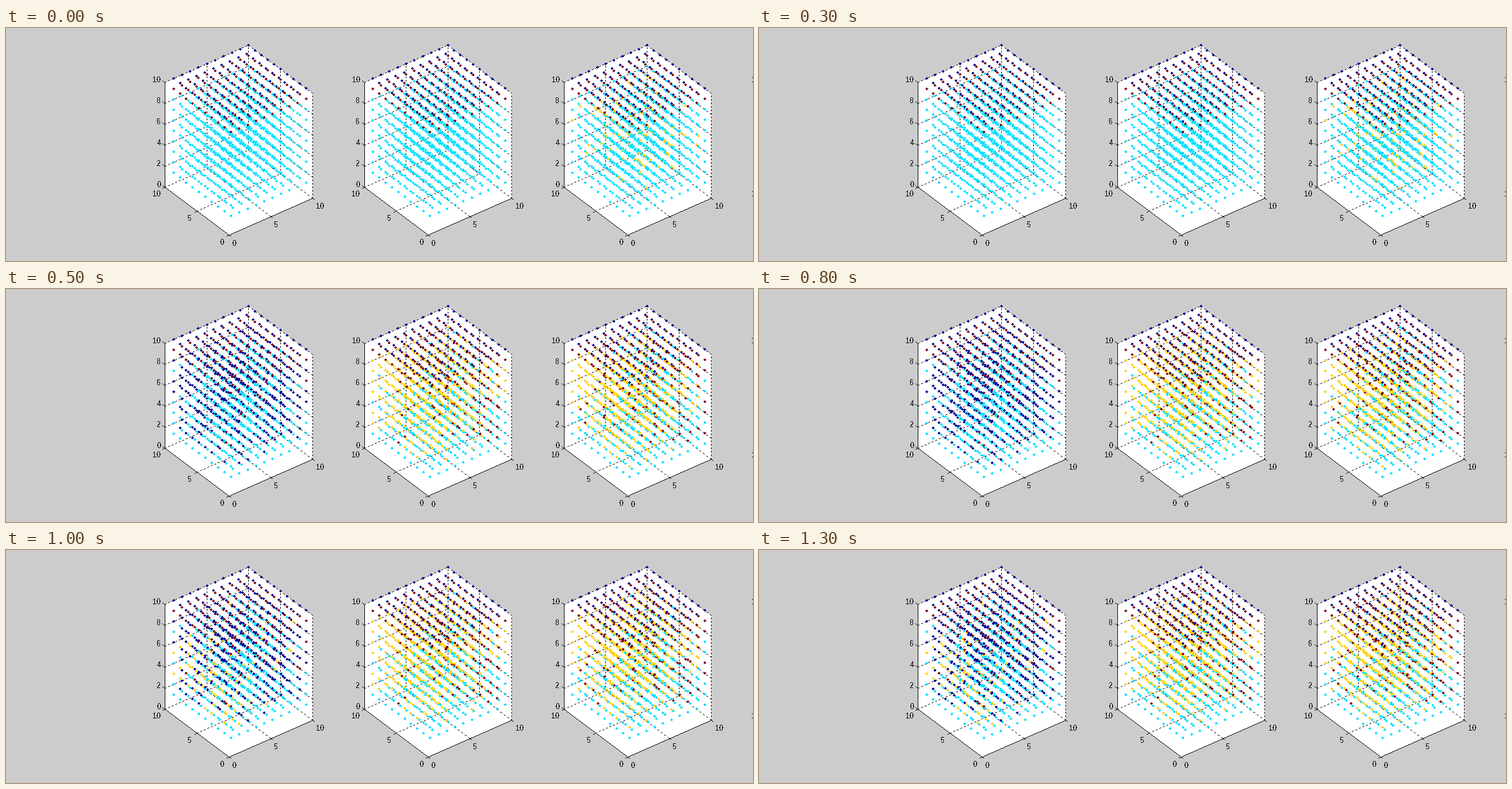
Animation of 1280 by 400 pixels, one loop 1500 ms. Source, as a matplotlib script:

```python
import numpy as np
import matplotlib.pyplot as plt
from matplotlib.animation import FuncAnimation
from matplotlib.collections import PolyCollection

W, H, DPI = 1280, 400, 100
PX = 72 / DPI
GREY = "#cccccc"
BLUE, CYAN, GOLD, RED = range(4)
COLORS = np.array([(0, 0, 143), (0, 223, 255), (255, 207, 0), (128, 0, 0)]) / 255
SHIFTS = (0, 341.3, 683.25)

# Screen steps of one unit along each axis
ORIGIN = np.array([381.62, 354.65])
AXES = np.array([(14.29, -6.31), (-10.93, -8.21), (0, -18.0)])

# Outlines in whole pixels: one pixel, and a five pixel diamond
PIXEL = np.array([(0, 0), (1, 0), (1, 1), (0, 1)])
DOT = np.array([(0, -2), (1, -2), (1, -1), (2, -1), (2, 0), (3, 0),
                (3, 1), (2, 1), (2, 2), (1, 2), (1, 3), (0, 3),
                (0, 2), (-1, 2), (-1, 1), (-2, 1), (-2, 0), (-1, 0),
                (-1, -1), (0, -1)])

plt.rcParams.update({"font.family": "Liberation Sans",
                     "text.hinting": "native", "text.hinting_factor": 1})
fig = plt.figure(figsize=(W / DPI, H / DPI), dpi=DPI, facecolor=GREY)
ax = fig.add_axes([0, 0, 1, 1])
ax.set(xlim=(0, W), ylim=(H, 0))
ax.axis("off")


def project(points, shift):
    return np.round(ORIGIN + np.asarray(points) @ AXES + (shift, 0))


def stamp(cells, shape, color, order):
    """Draw one crisp shape on every pixel cell."""
    art = PolyCollection(cells[:, None] + shape, facecolors=color,
                         linewidths=0, zorder=order)
    return ax.add_collection(art, autolim=False)


def stroke(a, b, dotted=False):
    n = int(np.abs(b - a).max())
    cells = np.round(np.linspace(a, b, n + 1))
    if dotted:
        cells = cells[np.arange(n + 1) % 6 < 3]
    stamp(cells, PIXEL, "black", 2)


def line(a, b, shift, dotted=False):
    stroke(*project([a, b], shift), dotted)


def tick(point, step, shift):
    p = project(point, shift)
    stroke(p, p + step)


def label(x, y, text, align="center"):
    ax.text(x, y + 4.5, text, size=13 * PX, ha=align, va="baseline",
            antialiased=False, clip_on=True)


def draw_box(shift):
    outline = [(0, 10, 0), (0, 10, 10), (10, 10, 10), (10, 0, 10),
               (10, 0, 0), (0, 0, 0)]
    ax.fill(*(project(outline, shift) + 0.5).T, color="white", lw=0, zorder=1)
    for z in range(0, 11, 2):
        line((0, 10, z), (10, 10, z), shift, True)
        line((10, 10, z), (10, 0, z), shift, True)
        tick((0, 10, z), (-4, -3), shift)
        label(265.5 + shift, 268.5 - 18 * z, str(z), "right")
    for k in (5, 10):
        line((k, 10, 0), (k, 10, 10), shift, True)
    for k in (0, 5):
        line((10, k, 0), (10, k, 10), shift, True)
    line((5, 0, 0), (5, 10, 0), shift, True)
    line((0, 5, 0), (10, 5, 0), shift, True)
    for end in ((10, 0, 0), (0, 10, 0)):
        line((0, 0, 0), end, shift)
    line((0, 10, 0), (0, 10, 10), shift)
    for k in (0, 5, 10):
        tick((k, 0, 0), (3, 2), shift)
        tick((0, k, 0), (-4, 2), shift)
    for x, y, text in ((391, 369.5, "0"), (463, 337.5, "5"), (538.5, 305.5, "10"),
                       (370.5, 367.5, "0"), (315.5, 326.5, "5"), (258, 284.5, "10")):
        label(x + shift, y, text)


# Lattice sorted from far to near
grid = np.stack(np.meshgrid(*[np.arange(1, 11)] * 3, indexing="ij"), -1).reshape(-1, 3)
grid = grid[np.argsort(grid @ (-0.527, -0.687, 0.5), kind="stable")]
gx, gy, gz = grid.T
rng = np.random.default_rng(12)
noise = rng.random((3, len(grid)))
change = rng.random((2, len(grid)))
active = (gz > 1) & (gz < 9)


def base():
    state = np.full(len(grid), CYAN)
    state[gz == 9] = RED
    state[gz == 10] = BLUE
    return state


def put(state, mask, value):
    state[mask & active] = value
    return state


def eroding(step):
    state = base()
    if step:
        put(state, noise[0] < 0.3 + 0.055 * abs(gx - gy), BLUE)
        put(state, noise[0] > 0.98, RED)
    if step == 2:
        put(state, change[0] < np.where((gx < 5) & (gz < 7), 0.35, 0.03), GOLD)
        put(state, change[0] > 0.98, RED)
    return state


def settling(r, extra=0.0):
    gold = 0.85 - 0.055 * gx + 0.07 * (gz - 5)
    state = put(base(), r < gold, GOLD)
    return put(state, r > 0.99 - extra - 0.027 * gx, RED)


def lagging(step):
    if step == 0:
        return put(base(), (noise[2] < 0.15) & (gz > 2), GOLD)
    if step == 1:
        state = settling(noise[2])
        return put(state, (change[1] < 0.4) & (gz == 8) & (gx > 5), CYAN)
    return settling(np.where(change[1] < 0.25, noise[1], noise[2]), 0.02)


def states(step):
    middle = settling(noise[1]) if step else base()
    return eroding(step), middle, lagging(step)


clouds = []
for shift in SHIFTS:
    draw_box(shift)
    clouds.append(stamp(project(grid, shift), DOT, COLORS[base()], 3))

# Clipped labels of the next panel
label(265.5 + 1026, 88.5, "10", "right")
label(258 + 1026, 284.5, "10")


def update(step):
    for cloud, state in zip(clouds, states(step)):
        cloud.set_facecolor(COLORS[state])
    return clouds


anim = FuncAnimation(fig, update, frames=3, interval=500, repeat=True,
                     repeat_delay=0, blit=False)
plt.show()
```
